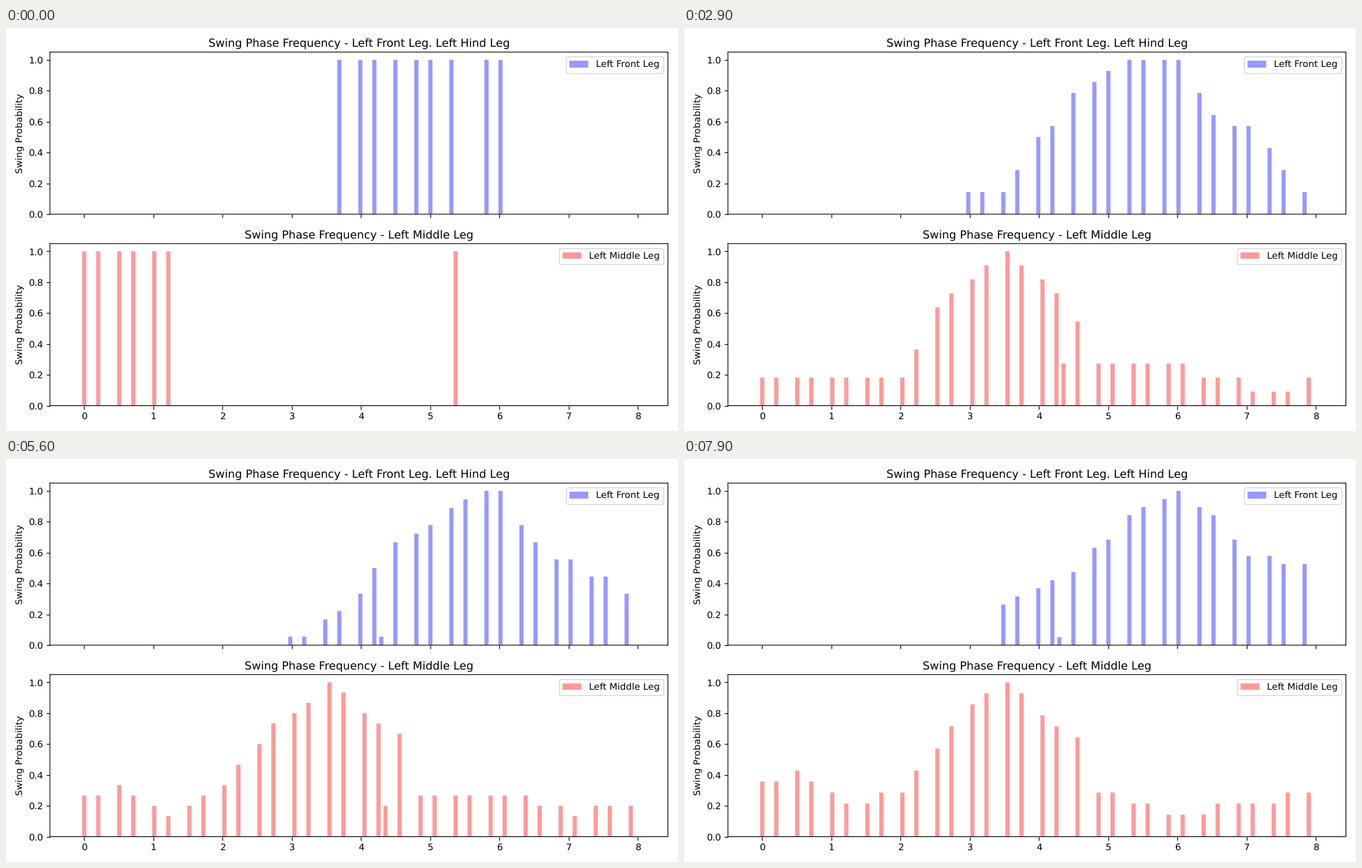
Write a matplotlib script that moves like this. It is 966 px wide and 580 px high and loops after 8000 ms.

```python
import matplotlib.pyplot as plt
import numpy as np
from matplotlib.animation import FuncAnimation

WIDTH, HEIGHT, DPI = 966, 580, 96.6
FRAMES, INTERVAL = 80, 100
BAR_WIDTH = 0.06
STRAY_BIN = 43

# Samples fall on every 2.5th of 80 time bins, plus one stray bin.
BINS = np.array([5 * m // 2 for m in range(18)] + [STRAY_BIN]
                + [(5 * m + 1) // 2 for m in range(18, 32)])
FRONT_BINS = BINS[12:]
TIMES = np.linspace(0, 8, 80)

# Frames in which the histograms are refreshed; they hold in between.
UPDATES = np.r_[1:3, 7:11, 14:18, 21, 23:25, 27, 29, 34, 36, 38, 40:43, 44:52,
                53:58, 60:62, 63:66, 67:70, 72:75, 76:80]


def updates_until(frame):
    return np.searchsorted(UPDATES, frame, side="right")


KEY_UPDATES = updates_until([0, 7, 17, 49, 79])


def first_stride(bins, spans):
    """One swing over the given spans of bins."""
    inside = sum((bins >= a) & (bins <= b) for a, b in spans)
    return inside * (bins != STRAY_BIN)


def profile(bins, knots, strides, stray=0):
    """Swing counts along a line through a few knots."""
    return np.where(bins == STRAY_BIN, stray, np.interp(bins, knots, strides))


def front_profile(strides, stray=0):
    knots = [32, 35, 40, 45, 53, 60, 65, 70, 78]
    return profile(FRONT_BINS, knots, strides, stray)


def middle_profile(strides, stray=0):
    knots = [0, 5, 12, 20, 27, 35, 40, 45, 48, 53, 60, 70, 78]
    return profile(BINS, knots, strides, stray)


FRONT = np.array([
    first_stride(FRONT_BINS, [(37, 53), (58, 60)]),
    front_profile([1, 1, 3, 4, 5, 5, 3, 3, 0]),
    front_profile([2, 2, 7, 10, 13, 12, 8, 8, 1]),
    front_profile([1, 2, 6, 13, 16, 18, 10, 9, 5], stray=1),
    front_profile([0, 5, 7, 9, 16, 19, 16, 11, 10], stray=1),
])
MIDDLE = np.array([
    first_stride(BINS, [(0, 12), (53, 53)]),
    middle_profile([1, 1, 2, 0, 1, 2, 1, 2, 1, 3, 1, 0, 1]),
    middle_profile([1, 1, 2, 1, 7, 9, 7, 5, 2, 3, 2, 1, 1], stray=2),
    middle_profile([3, 4, 2, 6, 11, 15, 13, 10, 4, 4, 5, 2, 3], stray=4),
    middle_profile([5, 6, 3, 4, 10, 14, 11, 9, 4, 3, 2, 3, 4]),
])


def probabilities(keys, frame):
    """Whole swing counts at a frame, scaled so that the tallest bin is 1."""
    done = updates_until(frame)
    counts = [np.interp(done, KEY_UPDATES, column) for column in keys.T]
    counts = np.floor(np.array(counts) + 0.5)
    return counts / counts.max()


def make_panel(ax, x, keys, color, title, label):
    bars = ax.bar(x, probabilities(keys, 0), BAR_WIDTH,
                  color=color, alpha=0.4, label=label)
    ax.set_title(title)
    ax.set_ylabel("Swing Probability")
    ax.set_xlim(-0.496, 8.436)
    ax.set_ylim(0, 1.05)
    ax.legend(loc="upper right")
    # Keep fractional pixel positions for soft, evenly spaced edges.
    for artist in [*bars, *ax.spines.values()]:
        artist.set_snap(False)
    return bars, keys


plt.rcParams["text.hinting"] = "none"
fig, axes = plt.subplots(2, 1, sharex=True, dpi=DPI,
                         figsize=(WIDTH / DPI, HEIGHT / DPI))
panels = [
    make_panel(axes[0], TIMES[FRONT_BINS] - BAR_WIDTH, FRONT, "blue",
               "Swing Phase Frequency - Left Front Leg. Left Hind Leg",
               "Left Front Leg"),
    make_panel(axes[1], TIMES[BINS], MIDDLE, "red",
               "Swing Phase Frequency - Left Middle Leg", "Left Middle Leg"),
]
fig.tight_layout()


def draw(frame):
    for bars, keys in panels:
        for bar, height in zip(bars, probabilities(keys, frame)):
            bar.set_height(height)
    return [bar for bars, _ in panels for bar in bars]


animation = FuncAnimation(fig, draw, frames=FRAMES, interval=INTERVAL,
                          repeat=True, repeat_delay=0)
plt.show()
```
